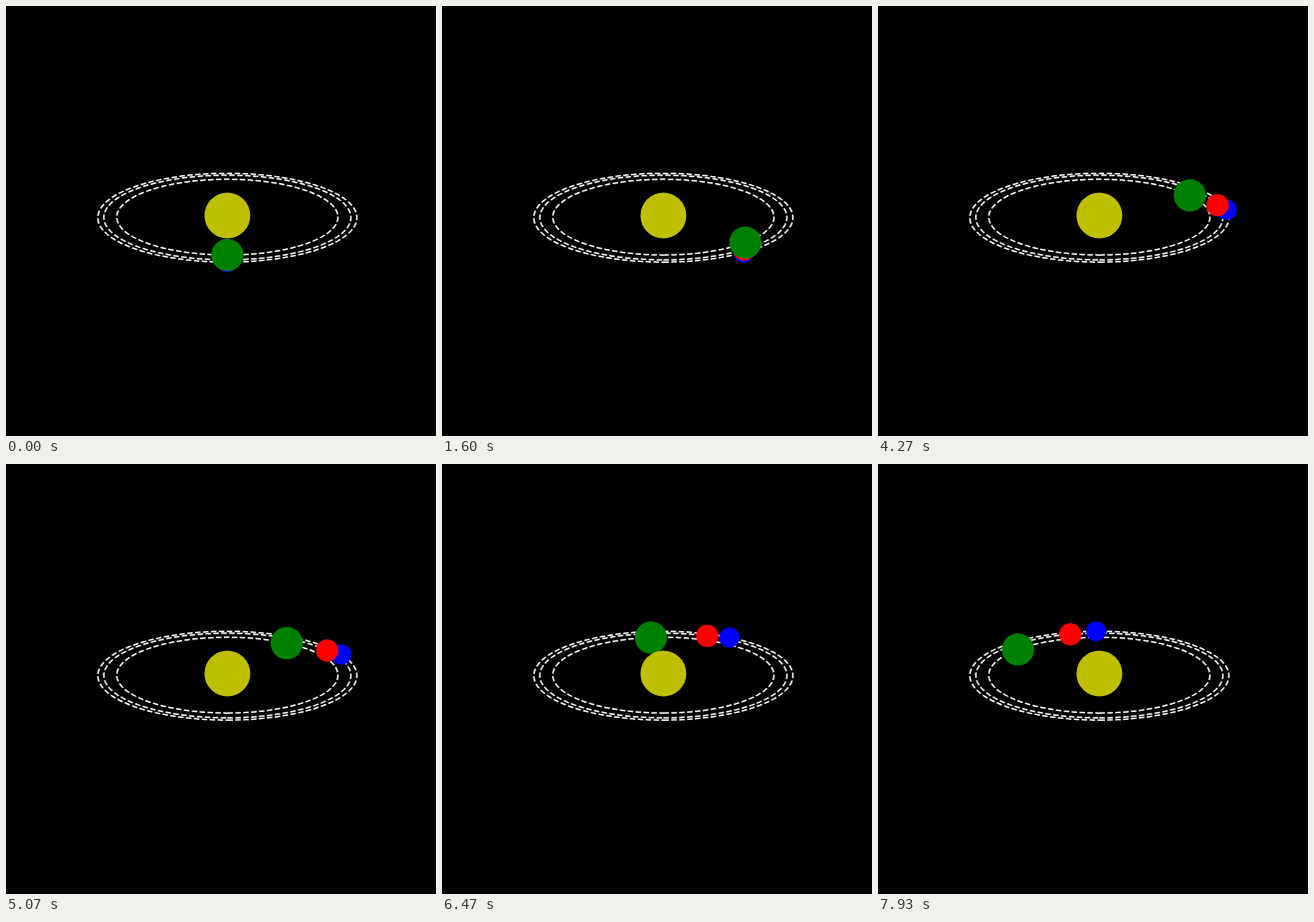
Recreate the animation shown at these times as an HTML page with a canvas. Size 432 by 432 pixels, loop 8 s.

```html
<!DOCTYPE html>
<html lang="en">
<head>
<meta charset="utf-8">
<title>Orbits</title>
<style>
  html, body { margin: 0; height: 100%; overflow: hidden; background: #000; }
  canvas { display: block; width: 100vw; height: 100vh; }
</style>
</head>
<body>
<canvas id="stage" width="432" height="432"></canvas>
<script>
const ctx = document.getElementById('stage').getContext('2d');
const LOOP = 8000, FRAMES_PER_MS = 0.015;
const CENTER = { x: 222.4, y: 210.6 };
const TILT = 0.342, PERSPECTIVE = 0.00036;

// Outermost first, so inner bodies cover outer ones; step is degrees per frame.
const planets = [
  { orbit: 130, radius: 10.2, color: '#00f', step: 1.525 },
  { orbit: 124, radius: 11.2, color: '#f00', step: 1.632 },
  { orbit: 111, radius: 16.2, color: '#008000', step: 1.925 }
];

// Angle 0 is the point nearest the viewer.
function project(orbit, degrees) {
  const angle = degrees * Math.PI / 180;
  const depth = orbit * Math.cos(angle);
  const scale = 1 / (1 - PERSPECTIVE * depth);
  return {
    x: CENTER.x + orbit * Math.sin(angle) * scale,
    y: CENTER.y + TILT * depth * scale
  };
}

function drawOrbit(orbit) {
  ctx.beginPath();
  for (let degrees = 0; degrees <= 360; degrees += 2) {
    const { x, y } = project(orbit, degrees);
    ctx.lineTo(x, y);
  }
  ctx.stroke();
}

function drawDisc({ x, y }, radius, color) {
  ctx.fillStyle = color;
  ctx.beginPath();
  ctx.arc(x, y, radius, 0, 2 * Math.PI);
  ctx.fill();
}

function draw(time) {
  const frame = Math.floor((time % LOOP + 4) * FRAMES_PER_MS) % 120;
  ctx.fillStyle = '#000';
  ctx.fillRect(0, 0, 432, 432);
  ctx.strokeStyle = '#fff';
  ctx.lineWidth = 1.5;
  ctx.setLineDash([5.55, 2.4]);
  planets.forEach(p => drawOrbit(p.orbit));
  planets.forEach(p => drawDisc(project(p.orbit, frame * p.step), p.radius, p.color));
  drawDisc(CENTER, 23, '#bfbf00');
}

const start = performance.now();
function tick() {
  draw(performance.now() - start);
  requestAnimationFrame(tick);
}
tick();
</script>
</body>
</html>
```
